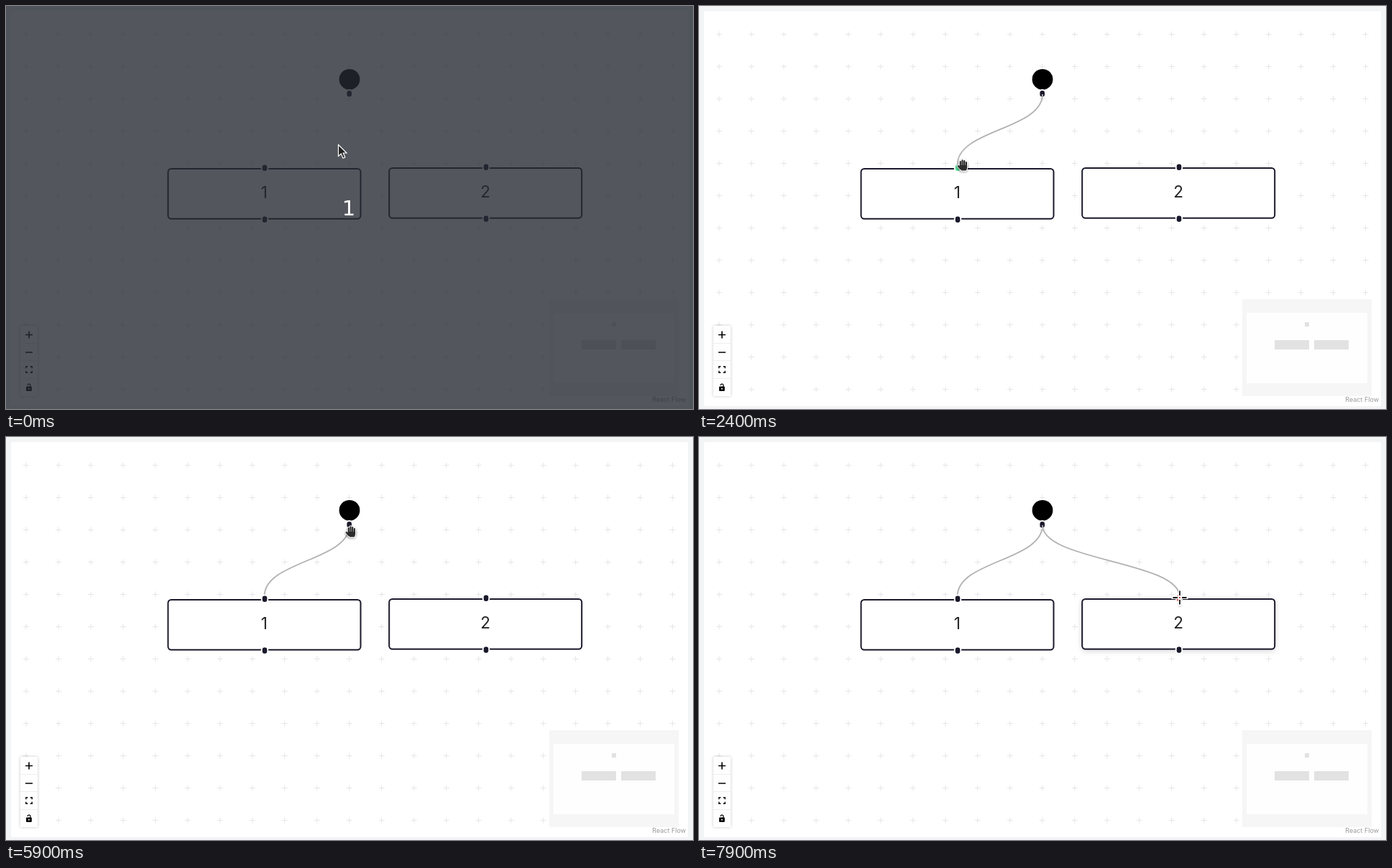
An HTML page with a canvas for the animation above (8000 ms loop, 956x562 px).

```html
<!DOCTYPE html>
<html lang="en">
<head>
<meta charset="utf-8">
<title>Node connection demo</title>
<style>
html, body { margin: 0; width: 100%; height: 100%; overflow: hidden; background: #f3f4f6; }
canvas { display: block; }
</style>
</head>
<body>
<canvas id="stage" width="956" height="562"></canvas>
<script>
const ctx = document.getElementById('stage').getContext('2d');
const LOOP = 8000, STEP = 100, SNAP = 38;
const INK = '#1a192b', RED = '#ff6060', GREEN = '#55dd99';
const source = { x: 477.7, y: 122.3 };
const nodes = [
  { x: 225.5, y: 227, w: 268, h: 69.8, label: '1', tx: 359.3, ty: 268, hx: 360, hy: 225.8 },
  { x: 533.2, y: 226, w: 268, h: 69.8, label: '2', tx: 667, ty: 267, hx: 668, hy: 224.8 }
];

// time, x, y, cursor kind
const track = [
  [0, 462, 193, 'arrow'], [100, 464, 199, 'hand'], [300, 464, 199, 'hand'],
  [500, 463, 200, 'hand'], [800, 467, 172, 'hand'], [1200, 473, 131, 'hand'],
  [1300, 479, 124, 'cross'], [1400, 480, 122, 'cross'], [1600, 480, 122, 'cross'],
  [1700, 476, 128, 'hand'], [2000, 430, 180, 'hand'], [2400, 367, 222, 'hand'],
  [2500, 366, 224, 'hand'], [3000, 668, 223, 'hand'], [3400, 503, 218, 'hand'],
  [3800, 364, 223, 'hand'], [4100, 356, 224, 'hand'], [4200, 356, 224, 'hand'],
  [4300, 358, 227, 'cross'], [4400, 380, 218, 'hand'], [4700, 464, 159, 'point'],
  [4800, 473, 146, 'point'], [4900, 478, 135, 'hand'], [5000, 478, 135, 'hand'],
  [5200, 476, 133, 'hand'], [5400, 476, 133, 'hand'], [5500, 476.5, 124, 'cross'],
  [5700, 476.5, 124, 'cross'], [5800, 478, 125, 'cross'], [5900, 480, 132, 'hand'],
  [6000, 479, 124, 'cross'], [6200, 479, 124, 'cross'], [6300, 486, 130, 'hand'],
  [6800, 662, 203, 'hand'], [7000, 672, 222, 'hand'], [7200, 673, 227, 'hand'],
  [7500, 670, 235, 'hand'], [7800, 668, 228, 'hand'], [7900, 669, 224, 'cross']
];

function cursorAt(t) {
  let i = track.length - 1;
  while (i > 0 && track[i][0] > t) i--;
  const a = track[i], b = track[i + 1] || a;
  const k = b === a ? 0 : (t - a[0]) / (b[0] - a[0]);
  return { x: a[1] + (b[1] - a[1]) * k, y: a[2] + (b[2] - a[2]) * k, kind: a[3] };
}

function fillRect(color, x, y, w, h) {
  ctx.fillStyle = color;
  ctx.fillRect(x, y, w, h);
}

function roundRect(x, y, w, h, r) {
  ctx.beginPath();
  ctx.roundRect(x, y, w, h, r);
}

function text(str, x, y, font, color, align = 'center') {
  ctx.font = font;
  ctx.fillStyle = color;
  ctx.textAlign = align;
  ctx.fillText(str, x, y);
}

function lines(points, color, width, cap = 'butt') {
  ctx.beginPath();
  for (const [x1, y1, x2, y2] of points) {
    ctx.moveTo(x1, y1);
    ctx.lineTo(x2, y2);
  }
  ctx.strokeStyle = color;
  ctx.lineWidth = width;
  ctx.lineCap = cap;
  ctx.stroke();
}

function withShadow(color, blur, dy, draw) {
  ctx.save();
  ctx.shadowColor = color;
  ctx.shadowBlur = blur;
  ctx.shadowOffsetY = dy;
  draw();
  ctx.restore();
}

function drawGrid() {
  fillRect('#f3f4f6', 0, 0, 956, 562);
  ctx.fillStyle = '#fff';
  roundRect(7, 7, 942, 551, 2);
  ctx.fill();
  const marks = [];
  for (let i = 0; i < 21; i++) {
    for (let j = 0; j < 12; j++) {
      const x = 28 + i * 44.98, y = 39.4 + j * 45.02;
      marks.push([x - 4, y, x + 4, y], [x, y - 4, x, y + 4]);
    }
  }
  lines(marks, '#e6e6e6', 1);
}

function drawEdge(x, y) {
  const sy = 123, mid = (sy + y) / 2;
  ctx.beginPath();
  ctx.moveTo(478, sy);
  ctx.bezierCurveTo(478, mid, x, mid, x, y);
  ctx.strokeStyle = '#b1b1b3';
  ctx.lineWidth = 1.8;
  ctx.lineCap = 'butt';
  ctx.stroke();
}

function drawHandle(x, y, color = INK) {
  ctx.fillStyle = '#fff';
  roundRect(x - 5.2, y - 6.2, 10.4, 12.4, 5.2);
  ctx.fill();
  ctx.fillStyle = color;
  roundRect(x - 3.3, y - 4.2, 6.6, 8.4, 3.2);
  ctx.fill();
}

function drawNode(n, color, hover) {
  ctx.fillStyle = '#fff';
  roundRect(n.x, n.y, n.w, n.h, 4.5);
  if (hover) withShadow('rgba(0,0,0,.2)', 8, 2, () => ctx.fill());
  else ctx.fill();
  ctx.strokeStyle = INK;
  ctx.lineWidth = 2;
  ctx.stroke();
  text(n.label, n.tx, n.ty, '22.5px Inter, sans-serif', '#222');
  drawHandle(n.hx, n.hy, color);
  drawHandle(n.hx, n.hy + 71.9);
}

function drawMinimap() {
  fillRect('#f6f6f6', 756, 409, 180, 135);
  fillRect('#fefefe', 762, 428, 168, 98);
  fillRect('#e2e2e2', 843, 441, 6, 6);
  fillRect('#e2e2e2', 801, 466, 48, 13);
  fillRect('#e2e2e2', 856, 466, 48, 13);
  fillRect('rgba(255,255,255,.5)', 897, 544, 52, 14);
  text('React Flow', 946, 552, '9px Inter, sans-serif', '#999', 'right');
}

function drawControls() {
  withShadow('rgba(0,0,0,.22)', 4, 0, () => fillRect('#fefefe', 20, 446, 24, 98));
  lines([470.5, 494.5, 519.5].map(y => [20, y, 44, y]), '#eee', 1);
  lines([[27, 458.5, 37, 458.5], [32, 453.5, 32, 463.5], [27, 483, 37, 483]], '#000', 1.6);
  for (const sx of [-1, 1]) {
    for (const sy of [-1, 1]) {
      ctx.beginPath();
      ctx.moveTo(32 + sx * 1.7, 507 + sy * 4.2);
      ctx.lineTo(32 + sx * 4.2, 507 + sy * 4.2);
      ctx.lineTo(32 + sx * 4.2, 507 + sy * 1.7);
      ctx.strokeStyle = '#000';
      ctx.lineWidth = 1.4;
      ctx.stroke();
    }
  }
  ctx.fillStyle = '#000';
  roundRect(28, 530.5, 7.8, 6.5, 1);
  ctx.fill();
  ctx.beginPath();
  ctx.arc(32, 529, 1.9, Math.PI, 0);
  ctx.lineTo(33.9, 531);
  ctx.lineWidth = 1.2;
  ctx.stroke();
  ctx.fillStyle = '#fff';
  ctx.beginPath();
  ctx.arc(31.9, 533.7, 1, 0, 7);
  ctx.fill();
}

function drawHand(pointing) {
  const fingers = pointing
    ? [[-3.2, -6.3, -3.2, 2], [-.3, -1, -.3, 2], [2.5, -.6, 2.5, 2], [5.2, 0, 5.2, 2]]
    : [[-3.2, -5, -3.2, 2], [-.5, -6.6, -.5, 2], [2.2, -5.8, 2.2, 2], [4.9, -4, 4.9, 2]];
  const thumb = [[-6.3, 1, -3, 5]];
  const palm = new Path2D('M-4.3 0H6.1V3.5Q6 6 4.4 7.6H-1.6Q-4.3 5.5-4.3 3Z');
  withShadow('rgba(0,0,0,.4)', 3, 1, () => {
    lines([...fingers, ...thumb], '#fff', 4.2, 'round');
    ctx.lineWidth = 2.2;
    ctx.lineJoin = 'round';
    ctx.stroke(palm);
  });
  lines([...fingers, ...thumb], '#2b2b2b', 2.2, 'round');
  ctx.fillStyle = '#2b2b2b';
  ctx.fill(palm);
}

function drawCross() {
  const arms = [[-9.5, 0, -3, 0], [3, 0, 9.5, 0], [0, -9.5, 0, -3], [0, 3, 0, 9.5]];
  withShadow('rgba(0,0,0,.25)', 2, 1, () => lines(arms, '#fff', 4, 'square'));
  lines(arms, '#111', 1.8);
}

function drawArrow() {
  const shape = new Path2D('M.5.5V16.5L4.3 13 7 19.2 9.8 18 7.2 12H12Z');
  ctx.fillStyle = '#222';
  ctx.fill(shape);
  ctx.strokeStyle = '#fff';
  ctx.lineWidth = 1.2;
  ctx.stroke(shape);
}

function drawCursor(c) {
  ctx.save();
  ctx.translate(c.x, c.y);
  if (c.kind === 'arrow') drawArrow();
  else if (c.kind === 'cross') drawCross();
  else drawHand(c.kind === 'point');
  ctx.restore();
}

function draw(t) {
  const cursor = cursorAt(t), linked = t >= 4300;
  const dragging = (t >= 1700 && t < 4300) || t >= 6300;
  let end = null, near = null;
  if (dragging) {
    end = cursorAt(t - 4);
    near = nodes.find(n => Math.hypot(n.hx - end.x, n.hy - end.y) < SNAP);
    if (near && !linked) end = { x: near.hx - .4, y: near.hy - 3.5 };
  }

  drawGrid();
  if (linked) drawEdge(359.6, 222);
  ctx.fillStyle = '#000';
  ctx.beginPath();
  ctx.arc(478, 102.3, 14.4, 0, 7);
  ctx.fill();
  drawHandle(source.x, source.y);
  for (const n of nodes) {
    const hover = t >= 7100 && n === nodes[1];
    drawNode(n, n === near ? (linked ? RED : GREEN) : INK, hover);
  }
  if (end) drawEdge(end.x, end.y - 1);
  drawMinimap();
  drawControls();

  if (t < 100) {
    fillRect('rgba(38,42,50,.79)', 0, 0, 956, 562);
    text('1', 477, 292, '29px "DejaVu Sans", sans-serif', '#fff');
  }
  drawCursor(cursor);
}

const start = performance.now();
function tick() {
  const t = (performance.now() - start) % LOOP;
  draw(Math.floor(t / STEP) * STEP);
  requestAnimationFrame(tick);
}
tick();
</script>
</body>
</html>
```
